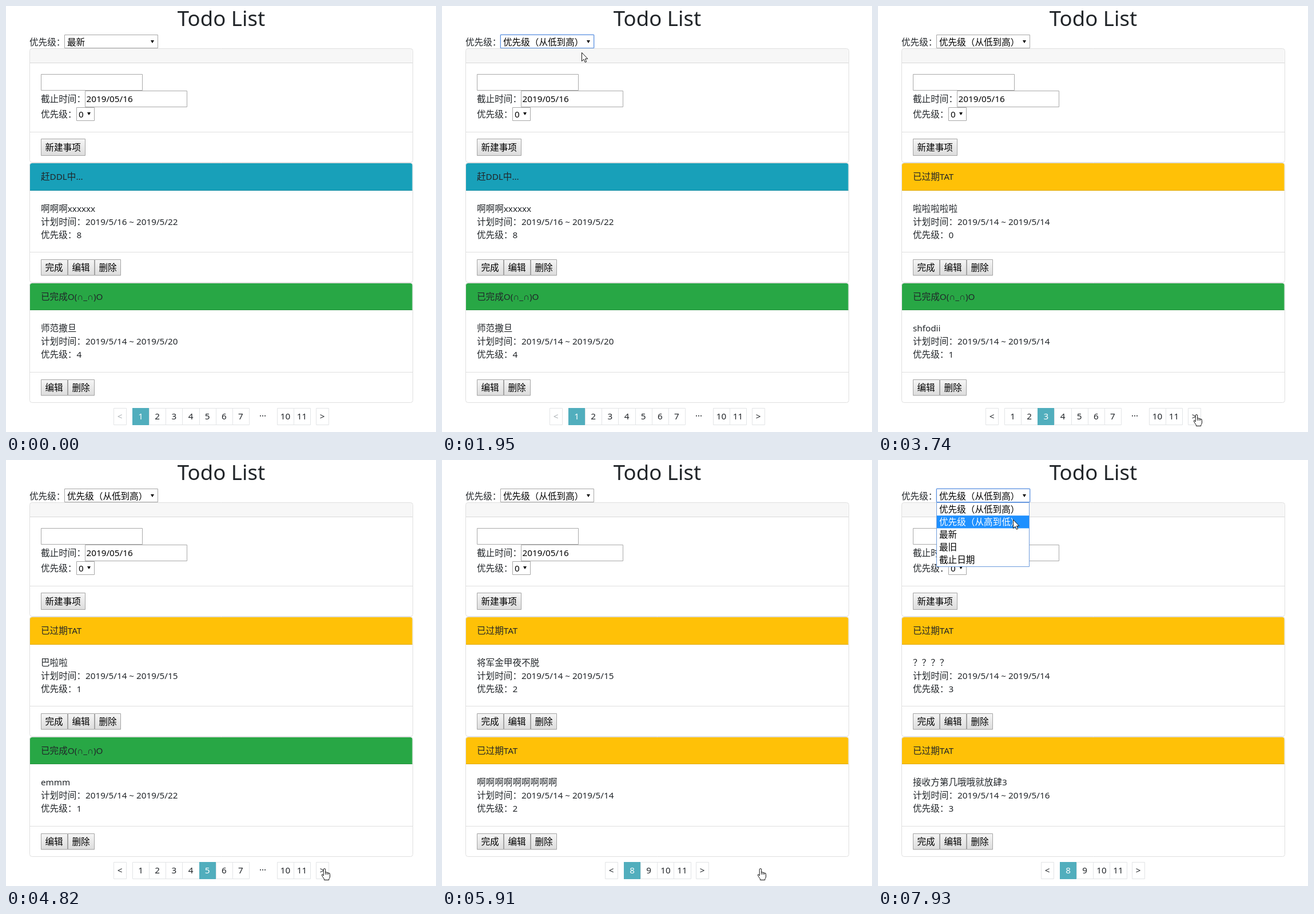
An HTML page with a canvas for the animation above (8 s loop, 752x745 px).

```html
<!DOCTYPE html>
<html lang="zh-CN">
<head>
<meta charset="utf-8">
<title>Todo List</title>
<style>
  html, body { margin: 0; width: 100%; height: 100%; overflow: hidden; background: #fff; }
  canvas { display: block; }
</style>
</head>
<body>
<canvas id="stage" width="752" height="745"></canvas>
<script>
const ctx = document.getElementById('stage').getContext('2d');
const LOOP = 8000;
const TICK = 77.8;
const INK = '#212529';
const LATIN = '15.25px "Noto Sans", "Open Sans", sans-serif';
const HAN = '15.6px "Noto Sans CJK SC", "Noto Sans CJK", sans-serif';

const STATUS = {
  doing: { label: '赶DDL中...', color: '#18a0b9' },
  done: { label: '已完成O(∩_∩)O', color: '#28a745' },
  late: { label: '已过期TAT', color: '#ffc107' }
};
const OPTIONS = ['优先级（从低到高）', '优先级（从高到低）', '最新', '最旧', '截止日期'];

// Each view holds two cards: status, title, start day, end day, priority.
const VIEWS = [
  [['doing', '啊啊啊xxxxxx', 16, 22, 8], ['done', '师范撒旦', 14, 20, 4]],
  [['late', '22223', 14, 15, 0], ['late', '不不不', 14, 16, 0]],
  [['late', '11111', 14, 15, 0], ['late', '啊啊啊', 14, 14, 0]],
  [['late', '啦啦啦啦啦', 14, 14, 0], ['done', 'shfodii', 14, 14, 1]],
  [['late', '哈哈哈', 14, 15, 1], ['late', '嗯嗯嗯', 14, 15, 1]],
  [['late', '巴啦啦', 14, 15, 1], ['done', 'emmm', 14, 22, 1]],
  [['late', '哦哦哦', 14, 15, 1], ['doing', '呵呵呵', 14, 22, 2]],
  [['late', '将军金甲夜不脱', 14, 15, 2], ['late', '啊啊啊啊啊啊啊啊啊', 14, 14, 2]],
  [['late', '？？？？', 14, 14, 3], ['late', '接收方第几哦哦就放肆3', 14, 16, 3]]
];

// Tracks of [start time, value].
const viewTrack = [[0, 0], [2040, 1], [3410, 2], [3740, 3], [3970, 4], [4820, 5], [5140, 6], [5370, 7], [6210, 8]];
const pageTrack = [[0, 1], [3030, 2], [3500, 3], [3880, 4], [4510, 5], [4910, 6], [5280, 7], [5910, 8]];
const focusTrack = [[0, false], [620, true], [3030, false], [7230, true]];
const menuTrack = [[0, -1], [790, 2], [1250, 0], [1950, -1], [7310, 0], [7850, 1]];
const sortTrack = [[0, 2], [1950, 0]];

// Pointer path: time, x, y.
const path = [
  [70, 672, 629], [230, 560, 380], [390, 400, 70], [470, 325, 2], [620, 257, 50],
  [790, 257, 56], [960, 253, 61], [1090, 253, 61], [1170, 249, 69], [1340, 244, 81],
  [2100, 244, 81], [2260, 320, 270], [2420, 455, 530], [2570, 525, 649], [2950, 557, 714],
  [6210, 557, 714], [6400, 510, 600], [6680, 350, 270], [6990, 246, 123],
  [7150, 252, 72], [7470, 252, 64], [7690, 252, 64], [7930, 236, 104], [8000, 236, 104]
];

const at = (track, t) => track.reduce((value, [start, next]) => t >= start ? next : value, track[0][1]);

function pointerAt(t) {
  const tick = Math.floor((t - 62) / TICK) * TICK + 70;
  const i = path.findIndex(p => p[0] > tick);
  if (i < 1) return path[i < 0 ? path.length - 1 : 0].slice(1);
  const [t0, x0, y0] = path[i - 1], [t1, x1, y1] = path[i];
  const k = (tick - t0) / (t1 - t0);
  return [Math.round(x0 + (x1 - x0) * k), Math.round(y0 + (y1 - y0) * k)];
}

function rect(x, y, w, h, fill) {
  ctx.fillStyle = fill;
  ctx.fillRect(x, y, w, h);
}

function frame(x, y, w, h, color, radius = 0) {
  ctx.strokeStyle = color;
  ctx.lineWidth = 1;
  ctx.beginPath();
  ctx.roundRect(x + .5, y + .5, w - 1, h - 1, radius);
  ctx.stroke();
}

// Draws Latin and Chinese runs with their own fonts, centred vertically on cy.
function text(str, x, cy, color = INK) {
  ctx.fillStyle = color;
  ctx.textAlign = 'left';
  for (const run of str.match(/[\x00-\x7f∩]+|[^\x00-\x7f∩]+/g)) {
    ctx.font = /[\x00-\x7f]/.test(run) ? LATIN : HAN;
    ctx.fillText(run, x, cy + 5.5);
    x += ctx.measureText(run).width;
  }
}

function centered(str, cx, cy, color) {
  ctx.font = LATIN;
  ctx.textAlign = 'center';
  ctx.fillStyle = color;
  ctx.fillText(str, cx, cy + 5.5);
}

function button(label, x, y, w, h) {
  const shade = ctx.createLinearGradient(0, y, 0, y + h);
  shade.addColorStop(0, '#f6f6f6');
  shade.addColorStop(1, '#dcdcdc');
  rect(x, y, w, h, shade);
  frame(x, y, w, h, '#a4a4a4');
  text(label, x + 7.5, y + h / 2, '#000');
}

function caret(x, y) {
  ctx.fillStyle = '#000';
  ctx.beginPath();
  ctx.moveTo(x, y);
  ctx.lineTo(x + 6, y);
  ctx.lineTo(x + 3, y + 5);
  ctx.fill();
}

function header(y, h, color) {
  ctx.fillStyle = color;
  ctx.beginPath();
  ctx.roundRect(41.5, y, 669, h, [3, 3, 0, 0]);
  ctx.fill();
  rect(42, y + h - 1, 669, 1, 'rgba(0,0,0,.125)');
}

function form(sort, focused) {
  ctx.font = '500 36.6px "Noto Sans", "Open Sans", sans-serif';
  ctx.textAlign = 'center';
  ctx.fillStyle = INK;
  ctx.fillText('Todo List', 376.5, 35);

  text('优先级：', 41, 63);
  frame(102, 50, 164, 24, focused ? '#5b92e0' : '#a6a6a6');
  if (focused) frame(101.5, 49.5, 165, 25, 'rgba(91,146,224,.6)', 1);
  text(OPTIONS[sort], 107, 63, '#000');
  caret(253, 60);

  header(75, 25, '#f7f7f7');
  frame(41, 74, 671, 200, '#dfdfdf', 4);
  frame(61, 119, 178, 29, '#a9a9a9');
  text('截止时间：', 61, 162);
  frame(138, 148, 179, 29, '#a9a9a9');
  text('2019/05/16', 140.5, 162, '#000');
  text('优先级：', 61, 189);
  frame(123, 177, 32, 24, '#a6a6a6');
  text('0', 127, 189, '#000');
  caret(142, 186);
  rect(42, 220, 669, 1, '#dfdfdf');
  button('新建事项', 61, 232, 78, 30);
}

function card([status, title, from, to, priority], y, shift) {
  const { label, color } = STATUS[status];
  header(y + 1, 48 - shift, color);
  frame(41, y, 671, 210, '#dfdfdf', 4);
  text(label, 61, y + 24.2);
  text(title, 61, y + 80 - shift / 2);
  text(`计划时间：2019/5/${from} ~ 2019/5/${to}`, 61, y + 103 - shift / 2);
  text('优先级：' + priority, 61, y + 126 - shift / 2);
  rect(42, y + 156, 669, 1, '#dfdfdf');
  const labels = status === 'done' ? ['编辑', '删除'] : ['完成', '编辑', '删除'];
  labels.forEach((name, i) => button(name, 61 + i * 47, y + 169, i === 2 ? 46 : 47, 28.5));
}

function pageBox(label, x, w, active, color = INK) {
  const left = Math.round(x), width = Math.round(x + w) - left;
  if (active) rect(left, 703, width, 30, '#51aebd');
  else frame(left, 703, width + 1, 30, '#e2e4e6');
  centered(label, x + w / 2, 717, active ? '#fff' : color);
}

function pager(page) {
  const late = page > 7;
  const pages = late ? [8, 9, 10, 11] : [1, 2, 3, 4, 5, 6, 7];
  const left = late ? 318 : 221;
  pageBox('<', left - 33, 22, false, page === 1 ? '#a9aeb2' : INK);
  // The active box is drawn last so that it covers its neighbours' borders.
  for (const n of [...pages.filter(n => n !== page), page])
    pageBox(String(n), left + (n - pages[0]) * 29.15, 29.15, n === page);
  if (!late) {
    for (let i = 0; i < 3; i++) rect(444 + i * 4, 716, 2, 1.5, INK);
    pageBox('10', 474, 29, false);
    pageBox('11', 503, 29, false);
  }
  pageBox('>', late ? 444 : 542, 22, false);
}

function menu(hover) {
  rect(102, 74, 163, 112.5, '#fff');
  rect(103, 75 + hover * 22.2, 161, 22.2, '#1e90ff');
  frame(102, 74, 163, 113, '#6d9bdc');
  OPTIONS.forEach((name, i) => text(name, 107, 86 + i * 22.2, i === hover ? '#fff' : '#000'));
}

const ARROW = new Path2D('M.5 .5V15.5L4 12.2L6.3 17.4L8.6 16.4L6.4 11.3H10.8Z');
const HAND = new Path2D('M-1.8 13V2.2Q-1.8.6 0 .6T1.7 2.2V7Q3.2 6 4.4 7.6Q6 6.8 7 8.4Q9.5 8 9.5 10.5V15Q9 17.5 7.8 18.5V20.5H-.6V18.5Q-2.6 16-4.6 12.6Q-5.2 10.6-3.5 10.7Z M1.7 7V11 M4.4 7.6V11 M7 8.4V11');

function pointer(t) {
  if (t < 70) return;
  const [x, y] = pointerAt(t);
  const shape = t >= 2950 && t < 6290 ? HAND : ARROW;
  ctx.save();
  ctx.translate(x, y);
  ctx.fillStyle = '#fff';
  ctx.strokeStyle = '#111';
  ctx.lineWidth = 1;
  ctx.lineJoin = 'round';
  ctx.fill(shape);
  ctx.stroke(shape);
  ctx.restore();
}

function draw(now) {
  const t = now % LOOP;
  const [first, second] = VIEWS[at(viewTrack, t)];
  const hover = at(menuTrack, t);
  rect(0, 0, 752, 745, '#fff');
  form(at(sortTrack, t), at(focusTrack, t));
  card(first, 274, 0);
  card(second, 484, 1);
  pager(at(pageTrack, t));
  if (hover >= 0) menu(hover);
  pointer(t);
}

const begin = performance.now();
function loop() {
  draw(performance.now() - begin);
  requestAnimationFrame(loop);
}
loop();
</script>
</body>
</html>
```
